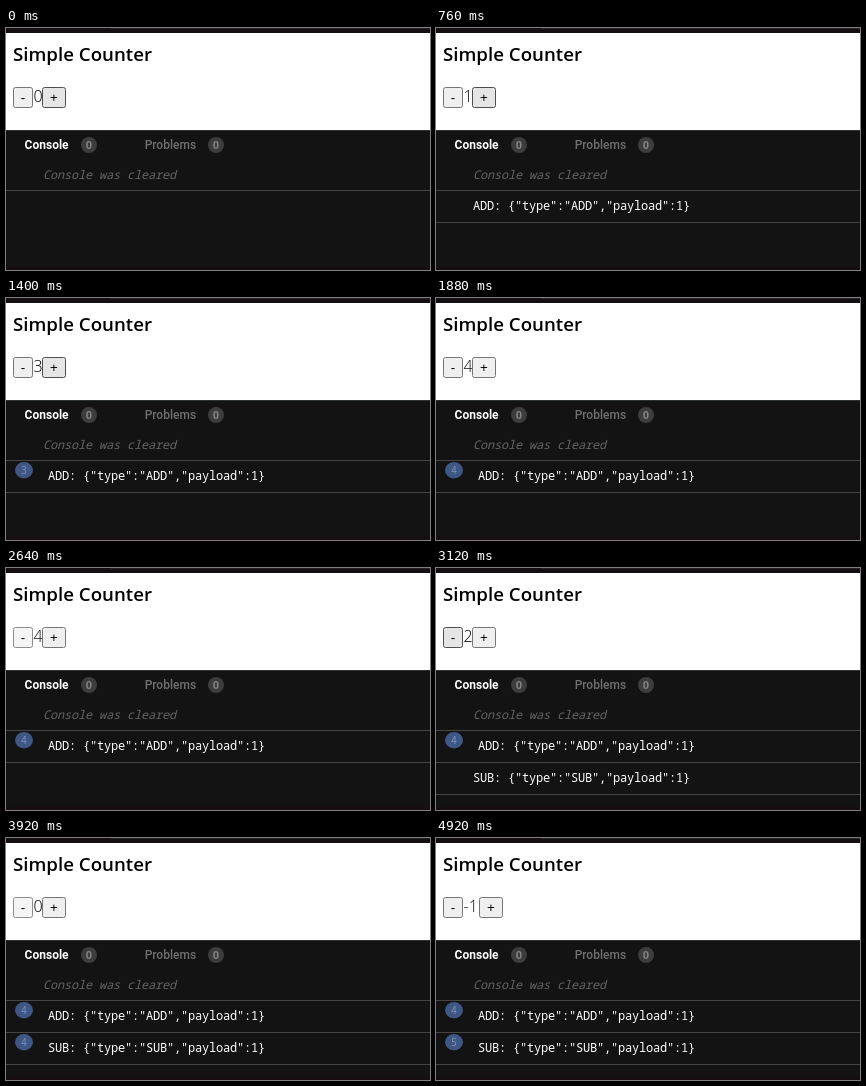
These frames come from a looping animation (424 px wide and 242 px high, 5320 ms). An HTML page:

```html
<!DOCTYPE html>
<html lang="en">
<head>
<meta charset="utf-8">
<title>Simple Counter</title>
<style>
html, body { margin: 0; width: 100%; height: 100%; overflow: hidden; background: #131313; }
svg { display: block; width: 424px; height: 242px; }
text { white-space: pre; }
.page { font: 300 16px "Open Sans", "Noto Sans", sans-serif; fill: #000; }
.page .title { font-size: 18.7px; font-weight: 600; }
.button text { font: 13.33px "Liberation Sans", Arial, sans-serif; text-anchor: middle; }
.button rect { fill: #efefef; stroke: #767676; }
.button.hover rect { fill: #e5e5e5; stroke: #4f4f4f; }
.button.active rect { fill: #f5f5f5; stroke: #8d8d8d; }
.tabs { font: 700 12px Roboto, sans-serif; fill: #fff; }
.tabs .dim { fill: #707070; font-weight: 500; }
.tabs circle { fill: #3d3d3d; }
.tabs .num { font-size: 11px; fill: #858585; text-anchor: middle; }
.log { font: 300 12px "Noto Sans Mono", "DejaVu Sans Mono", monospace; letter-spacing: calc(7px - 1ch); fill: #fff; }
.log .note { font-style: italic; fill: #646464; }
.log .num { font-size: 10px; letter-spacing: 0; text-anchor: middle; fill: #7890bc; }
.log ellipse { fill: #3f5784; }
.line { fill: #454545; }
</style>
</head>
<body>
<svg viewBox="0 0 424 242">
  <rect width="424" height="242" fill="#131313"/>
  <rect width="424" height="5" fill="#120e11"/>
  <rect x="105" width="319" height="1" fill="#262326"/>
  <rect y="5" width="424" height="97" fill="#fff"/>
  <rect y="102" width="424" height="1" fill="#2c322f"/>
  <rect y="239" width="424" height="3" fill="#160e11"/>

  <g class="page">
    <text class="title" x="7" y="33">Simple Counter</text>
    <text id="count" x="27.5" y="74">0</text>
    <g id="minus" class="button">
      <rect x="7.5" y="59.5" width="19" height="20" rx="2"/><text x="17" y="74">-</text>
    </g>
    <g id="plus" class="button">
      <rect x="36.5" y="59.5" width="23" height="20" rx="2"/><text x="48" y="74">+</text>
    </g>
  </g>

  <g class="tabs">
    <text x="18.6" y="121">Console</text>
    <circle cx="83" cy="117" r="8"/><text class="num" x="83" y="121">0</text>
    <text class="dim" x="138.7" y="121">Problems</text>
    <circle cx="210" cy="117" r="8"/><text class="num" x="210" y="121">0</text>
  </g>

  <g class="log">
    <text class="note" x="37" y="151">Console was cleared</text>
    <rect class="line" y="162" width="424" height="1"/>
    <g id="ADD"></g>
    <g id="SUB" transform="translate(0 32)"></g>
  </g>
</svg>
<script>
const LOOP = 5320;
const $ = id => document.getElementById(id);

// Each click: press time, count update, console update
const clicks = {
  ADD: [[680, 720, 760], [1040, 1120, 1120], [1280, 1360, 1400], [1480, 1560, 1600]],
  SUB: [[2640, 2720, 2760], [3040, 3120, 3160], [3360, 3440, 3480], [3720, 3800, 3840], [3920, 4040, 4120]]
};
const hovers = { ADD: [0, 1880], SUB: [1960, 4920] };
const buttons = { ADD: $("plus"), SUB: $("minus") };

for (const type in clicks) {
  const message = `${type}: ${JSON.stringify({ type, payload: 1 })}`;
  $(type).innerHTML = `<ellipse cx="18" cy="172.3" rx="9" ry="8.2"/><text class="num" x="18" y="176"></text>
    <text class="message" y="182">${message}</text><rect class="line" y="194" width="424" height="1"/>`;
}

const passed = (type, step, t) => clicks[type].filter(click => t >= click[step]).length;

function setButton(type, t) {
  const [from, to] = hovers[type];
  const active = clicks[type].some(([down, up]) => t >= down && t < up);
  const hover = t >= from && t < to;
  buttons[type].setAttribute("class", "button" + (active ? " active" : hover ? " hover" : ""));
}

function setRow(type, t) {
  const row = $(type), total = passed(type, 2, t), repeated = total > 1;
  row.style.display = total ? "" : "none";
  row.querySelector("ellipse").style.display = repeated ? "" : "none";
  row.querySelector(".num").textContent = repeated ? total : "";
  row.querySelector(".message").setAttribute("x", repeated ? 42 : 37);
}

function draw(now) {
  const t = now % LOOP;
  const count = passed("ADD", 1, t) - passed("SUB", 1, t);
  $("count").textContent = count;
  $("plus").setAttribute("transform", `translate(${count < 0 ? 7 : 0} 0)`);
  for (const type in clicks) {
    setButton(type, t);
    setRow(type, t);
  }
  requestAnimationFrame(draw);
}
draw(performance.now());
</script>
</body>
</html>
```
